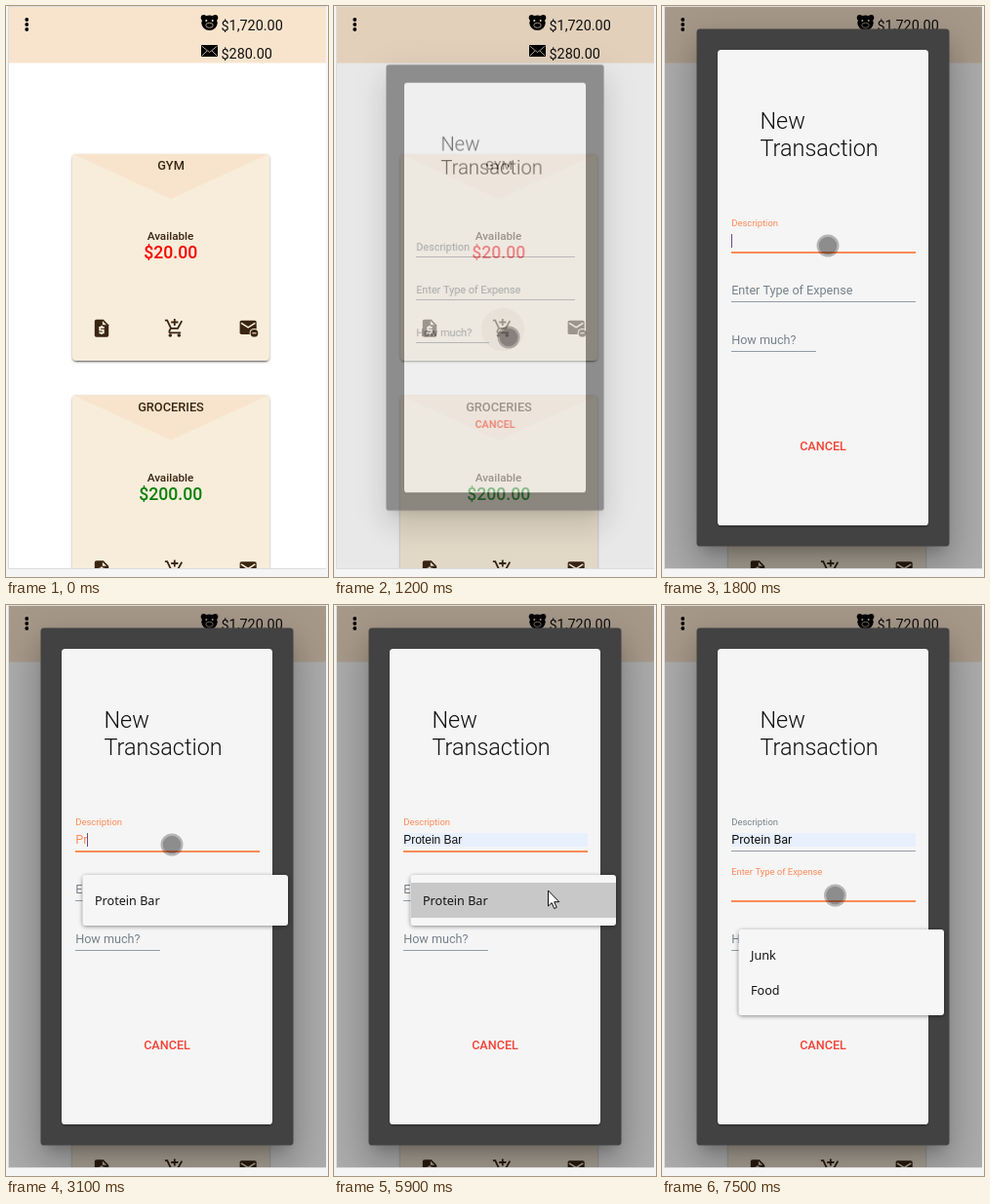
Recreate the animation shown at these times as an HTML page with a canvas. Size 330 px wide and 586 px high, loop 8 s.

```html
<!DOCTYPE html>
<html lang="en">
<head>
<meta charset="utf-8">
<title>Envelope budget</title>
<style>
html, body { margin: 0; width: 100%; height: 100%; overflow: hidden; background: #f5f5f5; }
canvas { display: block; width: 330px; height: 586px; }
</style>
</head>
<body>
<canvas id="stage" width="330" height="586"></canvas>
<script>
const W = 330, H = 586, LOOP = 8000, STEP = 100, PAD = 40;
const BROWN = '#3a2511', ORANGE = '#ff8a57', SLATE = '#77828c', PEACH = '#f8e4cd', CREAM = '#f8edda';
const UI = 'Roboto, sans-serif', SYS = '"Noto Sans", sans-serif';

const screen = document.getElementById('stage').getContext('2d');
const layer = document.createElement('canvas');
layer.width = W + PAD * 2;
layer.height = H + PAD * 2;
const dialogCtx = layer.getContext('2d');
let g = screen;

const clamp = (v, a = 0, b = 1) => Math.min(b, Math.max(a, v));
const mix = (a, b, p) => a + (b - a) * p;
const easeOut = (t, start, len, power) => 1 - Math.pow(1 - clamp((t - start) / len), power);

function rect(x, y, w, h, color) {
  g.fillStyle = color;
  g.fillRect(x, y, w, h);
}
function round(x, y, w, h, r, color) {
  g.fillStyle = color;
  g.beginPath();
  g.roundRect(x, y, w, h, r);
  g.fill();
}
function disc(x, y, r, color) {
  g.fillStyle = color;
  g.beginPath();
  g.arc(x, y, r, 0, Math.PI * 2);
  g.fill();
}
function text(str, x, y, font, color, align = 'left') {
  g.font = font;
  g.fillStyle = color;
  g.textAlign = align;
  g.fillText(str, x, y);
}
// Box shadow only: the casting box is kept off the canvas.
function shadow(x, y, w, h, dy, blur, spread, alpha) {
  const far = 2000;
  g.save();
  g.shadowColor = `rgba(0,0,0,${alpha})`;
  g.shadowBlur = blur;
  g.shadowOffsetX = far;
  g.shadowOffsetY = dy;
  round(x - far - spread, y - spread, w + spread * 2, h + spread * 2, 4, '#000');
  g.restore();
}
function icon(x, y, draw) {
  g.save();
  g.translate(x, y);
  g.scale(0.9, 0.9);
  g.fillStyle = g.strokeStyle = BROWN;
  g.lineWidth = 2;
  draw();
  g.restore();
}

function billIcon() {
  g.fill(new Path2D('M14 2H6Q4 2 4 4V20Q4 22 6 22H18Q20 22 20 20V8Z'));
  g.strokeStyle = CREAM;
  g.stroke(new Path2D('M15 11H10V14H14V17H9M12 9V11M12 17V19'));
  g.fillStyle = CREAM;
  g.fill(new Path2D('M13 3.5L17.5 8H13Z'));
}
function cartIcon() {
  g.stroke(new Path2D('M1 3H3.6L7.9 12H15.6L20.3 3.5M7.7 12L6.2 14.6Q5.3 17 7.4 17H19M12 1V9M8 5H16'));
  disc(7, 20, 2, BROWN);
  disc(17, 20, 2, BROWN);
}
function mailIcon() {
  round(2, 3, 19, 16, 2, BROWN);
  g.strokeStyle = CREAM;
  g.lineWidth = 1.8;
  g.stroke(new Path2D('M3.5 6L11.5 11L19.5 6'));
  disc(18.5, 17.5, 5.4, CREAM);
  disc(18.5, 17.5, 4.3, BROWN);
  rect(16.2, 16.9, 4.6, 1.2, CREAM);
}

function header() {
  rect(3, 1, 325, 57.5, PEACH);
  for (const y of [14, 19, 24]) disc(21.3, y, 1.9, '#000');
  disc(202.6, 12, 2.9, '#000');
  disc(214.4, 12, 2.9, '#000');
  g.beginPath();
  g.ellipse(208.5, 17.3, 8.2, 7.8, 0, 0, Math.PI * 2);
  g.fill();
  disc(205.3, 15, 1, PEACH);
  disc(211.7, 15, 1, PEACH);
  g.strokeStyle = '#b9a999';
  g.lineWidth = 0.9;
  g.beginPath();
  g.ellipse(208.5, 19.8, 3.7, 2.5, 0, 0, Math.PI * 2);
  g.stroke();
  rect(200, 40, 17, 12, '#000');
  g.strokeStyle = '#cbb9a6';
  g.stroke(new Path2D('M200.5 41L208.5 47.5L216.5 41M200.5 51.5L206 46M216.5 51.5L211 46'));
  text('$1,720.00', 220.5, 25, '14.4px ' + UI, '#111');
  text('$280.00', 220.5, 54, '14.4px ' + UI, '#111');
}

function card(y, name, sum, color) {
  shadow(68, y, 202, 212, 2, 2, -1, 0.5);
  shadow(68, y, 202, 212, 1, 3, 0, 0.3);
  round(68, y, 202, 212, 4, CREAM);
  g.fillStyle = PEACH;
  g.fill(new Path2D(`M69 ${y}H269L169 ${y + 46}Z`));
  text(name, 169, y + 16, '500 12.8px ' + UI, BROWN, 'center');
  text('Available', 168.5, y + 88, '500 11.7px ' + UI, BROWN, 'center');
  text(sum, 168.7, y + 107, '500 17.6px ' + UI, color, 'center');
  icon(87.2, y + 168, billIcon);
  icon(162, y + 168, cartIcon);
  icon(237.8, y + 168, mailIcon);
}

function page(t) {
  rect(0, 0, W, H, '#f5f5f5');
  rect(2, 0, 326, 578, '#dcdcdc');
  rect(3, 1, 325, 576, '#fff');
  g.save();
  g.beginPath();
  g.rect(3, 1, 325, 576);
  g.clip();
  header();
  card(152, 'GYM', '$20.00', '#f80000');
  card(399.5, 'GROCERIES', '$200.00', '#0a800a');
  if (t >= 1100 && t < 1500) disc(173, 332, t < 1200 ? 15 : 22, 'rgba(130,70,10,.1)');
  rect(3, 1, 325, 576, `rgba(0,0,0,${0.33 * easeOut(t, 1160, 400, 3)})`);
  g.restore();
}

// A form row; lift is the label's float progress, y the value baseline.
function field(label, y, width, lift, active) {
  const color = active ? ORANGE : SLATE;
  const size = mix(12.6, 9.45, lift);
  text(label, 71.2, mix(y, y - 19, lift), `${size}px ${UI}`, color);
  rect(71, y + 7, width, active ? 2 : 1, active ? ORANGE : '#929ca6');
}

function typed(t) {
  if (t < 2900) return '';
  if (t < 3100) return 'P';
  if (t < 3500) return 'Pr';
  return t < 5700 ? 'Pro' : 'Protein Bar';
}
function caretOn(t) {
  if (t < 1500) return false;
  if (t < 3500) return t < 2400 || t >= 2900;
  if (t < 5700) return Math.floor((t - 3500) / 500) % 2 === 0;
  if (t < 6900) return t >= 6400 && t < 6700;
  return t >= 7000 && t < 7500;
}

function dialog(t) {
  const second = t >= 6900;
  shadow(35.5, 23.5, 259, 531, 10, 13.5, -6, 0.2);
  shadow(35.5, 23.5, 259, 531, 21.6, 34, 2.7, 0.14);
  shadow(35.5, 23.5, 259, 531, 8, 41, 7.2, 0.12);
  round(35.5, 23.5, 259, 531, 3.6, '#424242');
  shadow(57, 45, 216, 488, 1.8, 2, 0, 0.25);
  round(57, 45, 216, 488, 3.6, '#f5f5f5');
  text('New', 100.5, 125.5, '300 23.4px ' + UI, '#111');
  text('Transaction', 100.5, 154.3, '300 23.4px ' + UI, '#111');

  const word = typed(t), preview = t >= 5700 && t < 6400;
  if (t >= 5700) rect(71, 234, 189, 14, '#e8f0fe');
  field('Description', 245, 189, clamp((t - 1400) / 300), t >= 1500 && !second);
  field('Enter Type of Expense', 296, 189, second ? clamp((t - 6800) / 200) : 0, second);
  field('How much?', 347, 87, 0, false);
  const font = preview ? '12px "Liberation Sans", sans-serif' : '12.6px ' + UI;
  text(word, 71.2, 245, font, t >= 5700 ? '#111' : ORANGE);
  if (caretOn(t)) {
    const x = second ? 71 : 71 + Math.round(g.measureText(word).width);
    rect(x, second ? 285 : 234, 1, 14, '#6b4a86');
  }
  text('CANCEL', 165, 456, '500 12.6px ' + UI, '#f44336', 'center');
}

function popup(y, items, hot) {
  const h = 16 + items.length * 36;
  shadow(78.5, y, 210.5, h, 1, 4, 0, 0.45);
  round(78.5, y, 210.5, h, 3, '#f6f6f6');
  if (hot) rect(79, y + 8, 210, 36, '#c8c8c8');
  items.forEach((item, i) => text(item, 91, y + 31 + i * 36, '500 12.6px ' + SYS, '#151515'));
}

// Pointer stops: time, x, y.
const trips = [
  [[200, 65, 25], [500, 125, 190], [800, 179, 340], [1400, 179, 340], [1600, 174, 278], [1700, 171, 251], [1800, 170, 246],
   [4300, 170, 246], [4500, 228, 292], [4700, 311, 356], [4900, 326, 385], [5100, 344, 416]],
  [[6400, 181, 292], [6500, 181, 292], [6700, 177.5, 298], [8000, 177.5, 298]]
];
const arrowTrip = [[5700, 268, 312], [5800, 238, 300], [5900, 219, 293], [6100, 219, 293], [6300, 194, 296], [6399, 184, 294]];

function along(stops, t) {
  const i = stops.findIndex(s => s[0] > t);
  if (i < 1) return null;
  const a = stops[i - 1], b = stops[i], p = (t - a[0]) / (b[0] - a[0]);
  return [mix(a[1], b[1], p), mix(a[2], b[2], p)];
}
function pointer(t) {
  for (const trip of trips) {
    const at = along(trip, t);
    if (!at) continue;
    disc(at[0], at[1], 11.5, 'rgba(0,0,0,.26)');
    disc(at[0], at[1], 9.3, 'rgba(0,0,0,.22)');
  }
  const tip = along(arrowTrip, t);
  if (!tip) return;
  g.save();
  g.translate(tip[0] + 0.5, tip[1]);
  const shape = new Path2D('M0 0V16L3.7 12.6L6.2 18.5L8.7 17.4L6.2 11.7H11.3Z');
  g.fillStyle = '#fff';
  g.strokeStyle = '#111';
  g.lineWidth = 1;
  g.fill(shape);
  g.stroke(shape);
  g.restore();
}

function render(t) {
  g = screen;
  g.clearRect(0, 0, W, H);
  page(t);
  const open = easeOut(t, 1160, 150, 2.5);
  if (open > 0) {
    g = dialogCtx;
    g.setTransform(1, 0, 0, 1, 0, 0);
    g.clearRect(0, 0, layer.width, layer.height);
    g.translate(PAD, PAD);
    dialog(t);
    g = screen;
    const s = mix(0.7, 1, open);
    g.save();
    g.beginPath();
    g.rect(3, 1, 325, 576);
    g.clip();
    g.globalAlpha = open;
    g.translate(165, 289);
    g.scale(s, s);
    g.drawImage(layer, -165 - PAD, -289 - PAD);
    g.restore();
  }
  if (t >= 3000 && t < 6400) popup(277, ['Protein Bar'], t >= 5700);
  if (t >= 6900) popup(333, ['Junk', 'Food'], false);
  pointer(t);
}

const begin = performance.now();
function tick() {
  const t = (performance.now() - begin) % LOOP;
  render(Math.floor(t / STEP) * STEP);
  requestAnimationFrame(tick);
}
tick();
</script>
</body>
</html>
```
